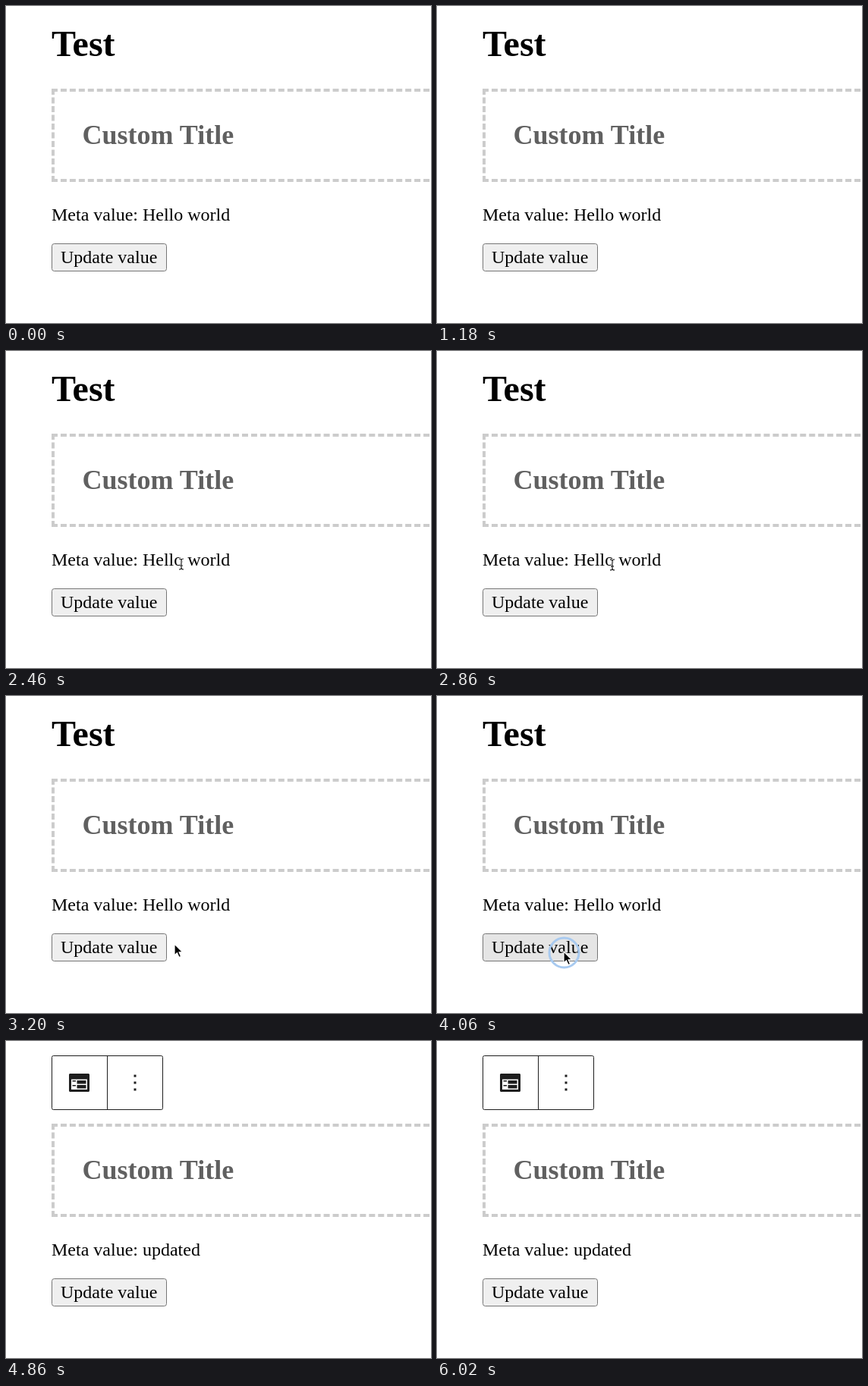
These frames come from a looping animation (560x418 px, 6040 ms). An HTML page:

```html
<!DOCTYPE html>
<html lang="en">
<head>
<meta charset="utf-8">
<style>
  html, body { margin: 0; width: 100%; height: 100%; overflow: hidden; background: #fff; }
  #stage { position: relative; width: 560px; height: 418px; overflow: hidden; }
  #box { position: absolute; left: 60px; top: 109px; width: 1000px; height: 123px;
         box-sizing: border-box; border: 4px dashed #ccc; }
  svg { position: absolute; left: 0; top: 0; }
  text { font: 24px "Liberation Serif", "Times New Roman", serif; }
  .h1 { font-size: 48px; font-weight: bold; }
  .h2 { font-size: 36px; font-weight: bold; fill: #606060; }
</style>
</head>
<body>
<div id="stage">
  <div id="box"></div>
  <svg width="560" height="418" viewBox="0 0 560 418">
    <text class="h1" x="60" y="66">Test</text>
    <text class="h2" x="100.5" y="182">Custom Title</text>
    <text id="meta" x="60" y="283">Meta value: Hello world</text>
    <rect id="button" x="60.5" y="313.5" width="151" height="36" rx="3" stroke="#767676"/>
    <text x="72" y="339">Update value</text>

    <g id="toolbar" fill="#1e1e1e">
      <rect x="60.5" y="19.5" width="146" height="71" rx="2" fill="#fff" stroke="#1e1e1e"/>
      <path d="M133.5 20v70" stroke="#1e1e1e"/>
      <path transform="translate(81.5 40) scale(1.5)" d="M2 2h16c.55 0 1 .45 1 1v14c0 .55-.45 1-1 1H2c-.55 0-1-.45-1-1V3c0-.55.45-1 1-1zm15 14V7H3v9h14zM4 8v1h3V8H4zm4 0v3h8V8H8zm-4 4v1h3v-1H4zm4 0v3h8v-3H8z"/>
      <path d="M168.5 44.5h3v3h-3zm0 9h3v3h-3zm0 9h3v3h-3z"/>
    </g>

    <circle id="ring" cx="167.5" cy="338.5" r="19.5" fill="none" stroke="#a8caf0" stroke-width="3"/>
    <g id="cursor">
      <path id="arrow" d="M0 0V15L3.4 11.8L6 17.6L8.6 16.5L6.1 10.8H10.7Z" fill="#000" stroke="#fff" stroke-width="1.2"/>
      <g id="beam" fill="none">
        <path d="M-3-7Q0-7 0-5Q0-7 3-7M0-5V5M-3 7Q0 7 0 5Q0 7 3 7M-2 2H2" stroke="#fff" stroke-width="3"/>
        <path d="M-3-7Q0-7 0-5Q0-7 3-7M0-5V5M-3 7Q0 7 0 5Q0 7 3 7M-2 2H2" stroke="#222" stroke-width="1.2"/>
      </g>
    </g>
  </svg>
</div>
<script>
const LOOP = 6040, ENTER = 1760, PRESS = 3980, UPDATE = 4140, LEAVE = 4520;
const $ = id => document.getElementById(id);
const show = (id, on) => $(id).setAttribute("visibility", on ? "visible" : "hidden");
const clamp = v => Math.max(0, Math.min(1, v));

// Pointer path: time, x, y
const path = [
  [ENTER, 258, 377], [2360, 232, 284], [2460, 231, 281], [2960, 231, 282],
  [3200, 222, 327], [3600, 167, 337], [4160, 167, 337], [LEAVE, 270, 420]
];

function pointer(t) {
  let i = 1;
  while (i < path.length - 1 && t > path[i][0]) i++;
  const [a, b] = [path[i - 1], path[i]];
  const u = clamp((t - a[0]) / (b[0] - a[0]));
  const e = u * u * (3 - 2 * u);
  return [a[1] + (b[1] - a[1]) * e, a[2] + (b[2] - a[2]) * e];
}

function draw(t) {
  const [x, y] = pointer(t);
  const visible = t >= ENTER && t < LEAVE;
  const overText = y > 262 && y < 294 && x < 296;
  const overButton = visible && x > 60 && x < 212 && y > 313 && y < 350;
  const updated = t >= UPDATE;

  $("cursor").setAttribute("transform", `translate(${x} ${y})`);
  show("arrow", visible && !overText);
  show("beam", visible && overText);
  show("toolbar", updated);
  $("meta").textContent = "Meta value: " + (updated ? "updated" : "Hello world");
  $("button").setAttribute("fill", overButton ? "#e5e5e5" : "#efefef");
  $("ring").setAttribute("opacity", clamp((t - PRESS) / 60) * clamp((4220 - t) / 100));
}

function tick() {
  draw(performance.now() % LOOP);
  requestAnimationFrame(tick);
}
tick();
</script>
</body>
</html>
```
